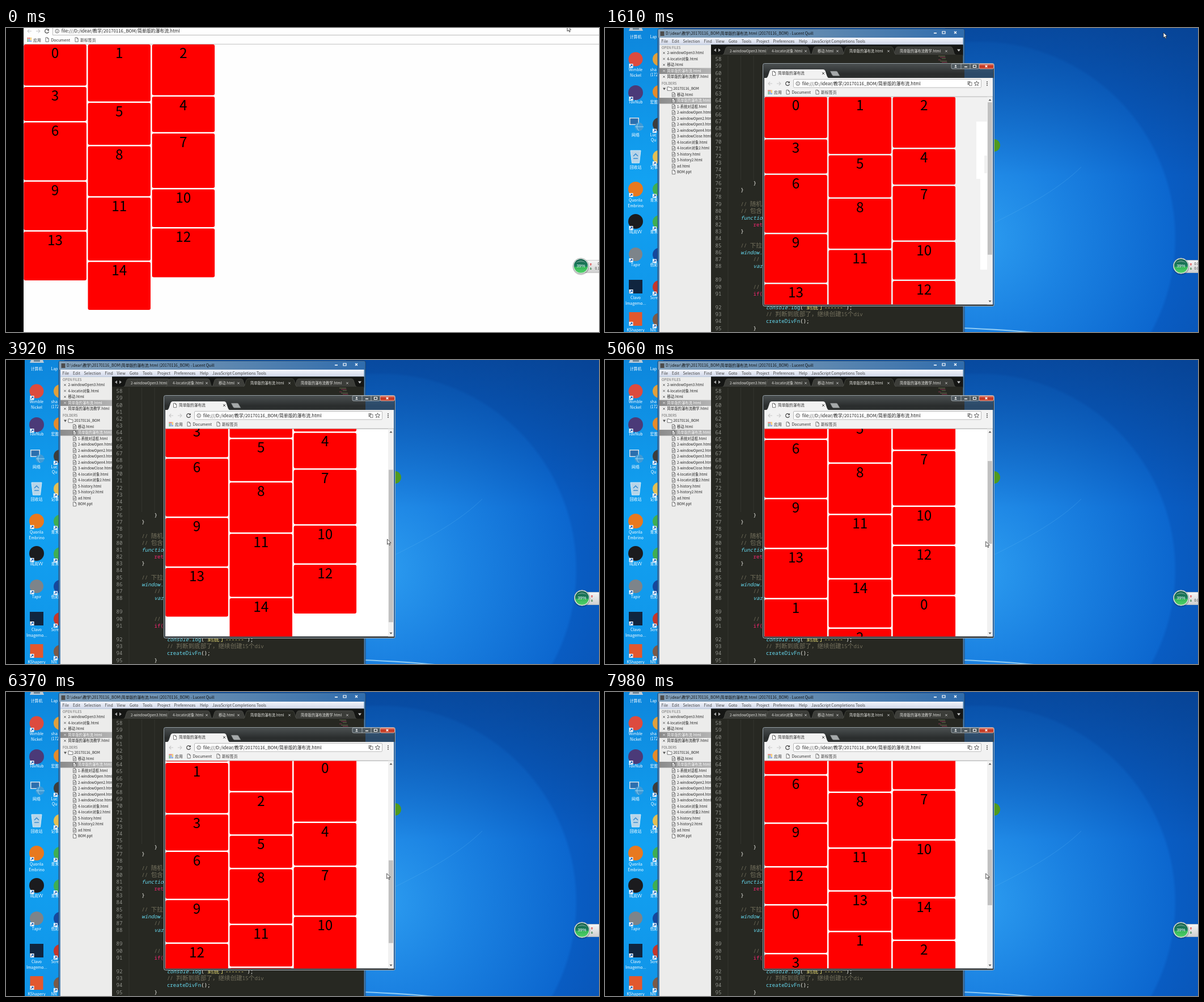
Write an HTML page that moves like this. It is 1046 by 536 pixels and loops after 8 s.

```html
<!DOCTYPE html>
<html lang="zh">
<head>
<meta charset="utf-8">
<title>瀑布流</title>
<style>
html, body { margin: 0; width: 100%; height: 100%; overflow: hidden; background: #000; }
svg { display: block; width: 100vw; height: 100vh; }
text { font-family: "Noto Sans CJK SC", "Noto Sans CJK", "Noto Sans", sans-serif; white-space: pre; }
.code { font-family: "Noto Sans Mono", "DejaVu Sans Mono", "Noto Sans CJK SC", monospace; }
.it { font-style: italic; }
.mid { text-anchor: middle; }
.num { font-size: 24.4px; text-anchor: middle; }
</style>
</head>
<body>
<svg id="stage" viewBox="0 0 1046 536" preserveAspectRatio="none"></svg>
<script>
const R = (x, y, w, h, fill, more = '') => `<rect x="${x}" y="${y}" width="${w}" height="${h}" fill="${fill}" ${more}/>`;
const C = (x, y, r, fill, more = '') => `<circle cx="${x}" cy="${y}" r="${r}" fill="${fill}" ${more}/>`;
const P = (d, fill, stroke = 'none', w = 1, more = '') => `<path d="${d}" fill="${fill}" stroke="${stroke}" stroke-width="${w}" ${more}/>`;
// y is the vertical middle of the line
const T = (x, y, s, size, fill, cls = '') => `<text x="${x}" y="${(y + size * .36).toFixed(2)}" font-size="${size}" fill="${fill}" class="${cls}">${s}</text>`;
const G = (id, body, more = '') => `<g id="${id}" ${more}>${body}</g>`;
const cross = (x, y, r, c, w = 1) => P(`M${x - r} ${y - r}l${2 * r} ${2 * r}m0 ${-2 * r}l${-2 * r} ${2 * r}`, 'none', c, w);
const page = (x, y, c = '#555') => P(`M${x - 2.5} ${y - 3.7}h3.2l2 2v5.4h-5.2zM${x + .7} ${y - 3.7}v2h2`, '#fff', c, .8);

const defs = `<defs>
<radialGradient id="glow" gradientUnits="userSpaceOnUse" cx="660" cy="370" r="520">
<stop offset="0" stop-color="#2c9cf0"/><stop offset=".3" stop-color="#1b82e2"/><stop offset=".66" stop-color="#0c67cf"/><stop offset=".67" stop-color="#095cc2"/><stop offset="1" stop-color="#084fae"/></radialGradient>
<linearGradient id="dusk" x2="0" y2="1"><stop offset="0" stop-color="#06397f" stop-opacity=".5"/><stop offset="1" stop-color="#06397f" stop-opacity="0"/></linearGradient>
<linearGradient id="left" x2="0" y2="1"><stop offset="0" stop-color="#0d86dc"/><stop offset=".5" stop-color="#12a2f2"/><stop offset="1" stop-color="#1094e8"/></linearGradient>
<linearGradient id="title"><stop offset="0" stop-color="#86a3bc"/><stop offset=".5" stop-color="#628ab0"/><stop offset="1" stop-color="#2f6cad"/></linearGradient>
<linearGradient id="menu" x2="0" y2="1"><stop offset="0" stop-color="#f3f5fb"/><stop offset="1" stop-color="#cfd6e8"/></linearGradient>
<linearGradient id="sel"><stop offset="0" stop-color="#8b8b8b"/><stop offset="1" stop-color="#b4b4b4"/></linearGradient>
<linearGradient id="glass" x2="0" y2="1"><stop offset="0" stop-color="#4a4f50"/><stop offset=".3" stop-color="#2a2d2d"/><stop offset="1" stop-color="#3a3d3c"/></linearGradient>
<linearGradient id="red" x2="0" y2="1"><stop offset="0" stop-color="#e0907f"/><stop offset=".5" stop-color="#c3331d"/><stop offset="1" stop-color="#d2553a"/></linearGradient>
<linearGradient id="pill" x2="0" y2="1"><stop offset="0" stop-color="#f6f6f6"/><stop offset="1" stop-color="#cfcfcf"/></linearGradient>
<linearGradient id="liquid" x2="0" y2="1"><stop offset="0" stop-color="#0e5a45"/><stop offset=".55" stop-color="#1f8561"/><stop offset=".56" stop-color="#35b558"/><stop offset="1" stop-color="#4fd068"/></linearGradient>
<clipPath id="view"><rect x="281" y="121.5" width="402.5" height="366"/></clipPath>
</defs>`;

function wallpaper() {
  return R(33, 0, 1013, 536, 'url(#glow)') + R(600, 0, 446, 260, 'url(#dusk)') + R(33, 0, 70, 536, 'url(#left)')
    + P('M687 343C750 312 805 280 840 245', 'none', '#5db6f2', 1, 'opacity=".3"')
    + P('M630 529C680 531 720 533 765 538', 'none', '#b9e6fb', 2.2, 'opacity=".75"')
    + C(686, 207, 11, '#4f9a1e');
}

function icons() {
  const label = (y, ...rows) => rows.map((s, i) => T(54, y + i * 9.3, s, 6.9, '#fff', 'mid')).join('');
  const link = (y, x = 42.5) => R(x, y, 7, 7, '#f4f8fc') + P(`M${x + 1.5} ${y + 5.5}l3.5 -3.5m-2.4 -.2h2.6v2.6`, 'none', '#1f62b5', 1.1);
  let s = P('M44 0h21l2 5h-25z', '#b9cad8') + R(49, 0, 11, 3, '#6e8799') + label(16, '计算机');
  s += C(54, 55, 12.5, '#dd4b3e') + link(63) + label(74, 'Wimble', 'Nickel');
  s += C(54, 114, 13, '#4b3a78') + link(121) + label(131, 'TovNub');
  s += R(43, 158, 17, 13, '#d7e3ec') + R(44.5, 159.5, 14, 10, '#2b6fae') + C(60, 174, 7.5, '#3f9ad6') + P('M53 174h15M60 167c-5 4-5 10 0 14', 'none', '#a9dcf2', .9) + label(189, '网络');
  s += P('M45 216h18l-2.5 22h-13z', '#c9dbe8', '#eef5f9', 1, 'opacity=".9"') + P('M50 226l4-4 4 4m-8 4h8', 'none', '#3d8fd1', 1.6) + label(246, '回收站');
  s += C(54, 284, 13, '#e8791f') + link(291) + label(304, 'Quorila', 'Embrino');
  s += C(54, 341, 13, '#1b1b1e') + link(349) + label(360, '鸣岚VV');
  s += C(54, 399, 12, '#7d848a') + link(406) + label(418, 'Tapir');
  s += R(42, 444, 24, 24, '#10253f') + link(461) + label(476, 'Clavo', 'Imagemo...');
  s += R(42.5, 501, 23, 24, '#e2582e') + link(518) + label(533, 'KShapery');
  const side = ['#e0a03c', '#e58b2b', '#3d3d3d', '#e3bf54', '#3fae53', '#3fae53', '#16489c', '#c4372c', '#7b5a48'];
  side.forEach((c, i) => s += C(96, 55 + i * 57.4, 12, c) + (i > 1 ? link(63 + i * 57.4, 84) : ''));
  [[16, 'Lap'], [74, 'sha'], [83, '(172'], [131, '宏图'], [189, 'Luc'], [198, ' Qu'], [246, '记事'], [304, '青禾'], [360, '青禾'], [418, '色彩'], [476, 'Scree'], [533, 'NN']]
    .forEach(([y, t]) => s += T(79.5, y, t, 6.9, '#fff'));
  return s;
}

const file = '简单版的瀑布流.html';

function editor() {
  let s = R(93, 1.5, 541, 540, '#4a7fb2', 'rx="3" stroke="#1d3a5a" stroke-width=".8"') + R(94, 2.5, 539, 14.5, 'url(#title)');
  s += R(97.5, 6, 7, 8, '#4c4c4c') + T(107, 10, `D:\\idear\\教学\\20170116_BOM\\${file} (20170116_BOM) - Lucent Quill`, 6.85, '#111');
  s += P('M580 9h5', 'none', '#fff', 1.6) + P('M595 6h5v4h-5z', 'none', '#fff', 1.2) + cross(618, 8, 2, '#fff', 1.3);
  s += R(96, 17, 535.5, 12.5, 'url(#menu)');
  [['File', 99.5], ['Edit', 118], ['Selection', 137.5], ['Find', 174.5], ['View', 195.5], ['Goto', 218], ['Tools', 241], ['Project', 267], ['Preferences', 296.5], ['Help', 342], ['JavaScript Completions Tools', 364]]
    .forEach(([t, x]) => s += T(x, 23.5, t, 6.9, '#444'));

  s += R(96, 29.5, 91, 507, '#ececeb') + T(100, 35, 'OPEN FILES', 6.1, '#666') + T(100, 97.5, 'FOLDERS', 6.1, '#666');
  s += R(96, 70.5, 91, 10.5, 'url(#sel)') + R(96, 123, 91, 10.5, 'url(#sel)');
  ['2-windowOpen3.html', '4-locatin对象.html', '移动.html', file, '简单版的瀑布流教学.html'].forEach((t, i) => {
    const y = 44 + i * 10.5, c = i == 3 ? '#fff' : '#222';
    s += cross(104, y, 1.7, i == 3 ? '#ddd' : '#666') + T(109.5, y, t, 6.35, c);
  });
  s += P('M102 105.5h5l-2.5 4z', '#555') + P('M110 104h3l1 1.2h4v5h-8z', '#fff', '#555', .8) + T(120.5, 107, '20170116_BOM', 6.3, '#222');
  ['移动.html', file, '1-系统对话框.html', '2-windowOpen.html', '2-windowOpen2.html', '2-windowOpen3.html', '2-windowOpen4.html', '3-windowClose.html', '4-locatin对象.html', '4-locatin对象2.html', '5-history.html', '5-history2.html', 'ad.html', 'BOM.ppt'].forEach((t, i) => {
    const y = 117.5 + i * 10.5;
    s += page(121, y) + (i < 13 ? P(`M119.5 ${y}h3m-3 1.7h3`, 'none', '#555', .8) : '') + T(127, y, t, 6.25, i == 1 ? '#fff' : '#222');
  });

  s += R(187, 29.5, 444.5, 507, '#272822') + R(187, 29.5, 444.5, 17.5, '#151614');
  s += P('M196 36v6l-4-3zM200 36v6l4-3z', '#aaa') + P('M621 37.5h6l-3 4z', '#ccc');
  [[212, 78, '2-windowOpen3.html', 0], [286, 74, '4-locatin对象.html', 354], [367, 52, '移动.html', 410], [512, 102, '简单版的瀑布流教学.html', 602], [423, 86, file, 500]].forEach(([x, w, t, close], i) => {
    s += P(`M${x - 6} 47.5q4 0 5 -6l2 -6q1 -2.5 4 -2.5h${w - 10}q3 0 4 2.5l2 6q1 6 5 6z`, i == 4 ? '#272822' : '#3c3d39', '#5a5b55', .6);
    s += T(x + 8, 40.8, t, 6.3, '#e4e4e0') + (close ? cross(close, 40.8, 1.7, '#bbb') : '');
  });
  s += R(187, 47, 444.5, 2, '#272822');
  for (let i = 0; i < 6; i++) s += R(588 + i % 3 * 3, 49 + i * 2.2, 12 - i % 4 * 2.5, 1, i % 2 ? '#8a3550' : '#66704f');
  [217, 239.5, 262].forEach((x, i) => s += P(`M${x} 49V${i ? 268 : 536}`, 'none', '#3b3c36', .7));

  const row = n => 55 + (n - 58 + (n > 88) + (n > 91)) * 12.16;
  for (let n = 58; n <= 95; n++) s += T(194.5, row(n), n, 9.15, '#8f908a', 'code');
  const cjk = t => t.replace(/[\u3000-\uffef]+/g, '<tspan font-size="10.6">$&</tspan>');
  const white = '#f8f8f2', grey = '#75715e', pink = '#f92672', cyan = '#66d9ef', str = '<tspan fill="#e6db74">';
  [[76, 2, '}', white], [77, 1, '}', white], [79, 1, '// 随机', grey], [80, 1, '// 包含', grey], [81, 1, 'function', cyan, 'it'],
   [82, 2, 'return', pink], [83, 1, '}', white], [85, 1, '// 下拉', grey], [86, 1, 'window.', cyan, 'it'], [87, 2, '//', grey],
   [88, 2, 'var', cyan, 'it'], [90, 2, '//', grey], [91, 2, 'if(', pink],
   [92, 3, `<tspan class="it">console</tspan>.log<tspan fill="${white}">(</tspan>${str}"到底了------"</tspan><tspan fill="${white}">);</tspan>`, cyan],
   [93, 3, '// 判断到底部了，继续创建15个div', grey], [94, 3, `createDivFn<tspan fill="${white}">();</tspan>`, cyan], [95, 2, '}', white]]
    .forEach(([n, tab, t, c, cls = '']) => s += T(217 + tab * 22.3, row(n), cjk(t), 9.15, c, 'code ' + cls));
  return s;
}

function frame() {
  let s = R(278.5, 62.5, 408, 428, '#3a4145', 'rx="3" stroke="#b3bec5" stroke-width=".8"') + R(279.5, 63.5, 406, 58, 'url(#glass)', 'rx="2"');
  s += R(634, 64, 51, 24, '#2d6299', 'opacity=".55"') + R(684, 88, 2, 400, '#2f66a0');
  s += R(611, 63, 49, 9, '#4f595f', 'rx="2" stroke="#c7d0d6" stroke-width=".7"') + R(660, 63, 25.5, 9, 'url(#red)', 'rx="2" stroke="#e8c9c2" stroke-width=".7"');
  s += P('M628 63v9M644 63v9', 'none', '#c7d0d6', .7) + C(618.5, 66.5, 1.3, '#fff') + P('M616 70q2.5 -3 5 0z', '#fff');
  s += P('M634 68.5h5', 'none', '#fff', 1.5) + P('M649.5 65.5h5v4h-5z', 'none', '#fff', 1.1) + cross(672.5, 67.5, 1.8, '#fff', 1.3);
  s += R(281, 88, 403, 33.5, '#f2f2f2') + P('M283 88.5q3 0 4.5 -4l3 -9q1 -2.5 3.5 -2.5h91q2.5 0 3.5 2.5l3 9q1.5 4 4.5 4z', '#f2f2f2');
  s += P('M397 76h11q1.5 0 2.2 1.5l4 7h-11q-2 0 -2.8 -2z', '#a5a9aa', '#55595a', .6);
  s += page(298, 80) + T(305, 80, '简单版的瀑布流', 6.7, '#333') + cross(385, 80, 2, '#444');
  s += R(332.5, 90.5, 331, 14.5, '#fff', 'rx="1.5" stroke="#b4b4b4" stroke-width=".9"');
  s += R(639.5, 94, 5, 6, '#8a8a8a') + R(642.5, 96, 4.5, 5.5, '#fff', 'stroke="#666" stroke-width=".8"') + T(640, 97, 'A', 4, '#fff');
  s += P('M655.5 93.5l1.2 2.9 3.1 .2-2.4 2 .8 3-2.7-1.7-2.7 1.7 .8-3-2.4-2 3.1-.2z', 'none', '#555', .9);
  [95, 98, 101].forEach(y => s += C(674, y, .9, '#444'));
  return s + P('M281 121h403', 'none', '#bdbdbd', .9);
}

function toolbar() {
  const arrow = (x, d) => P(`M${x + 3.5 * d} 98h${-7 * d}m${3.2 * d} -3.2l${-3.2 * d} 3.2l${3.2 * d} 3.2`, 'none', '#c8c8c8', 1.1);
  let s = arrow(291.5, 1) + arrow(306.5, -1);
  s += P('M325 96.3a3.4 3.4 0 1 0 .4 2.5', 'none', '#444', 1.2) + P('M325.9 93.8v3.4h-3.4z', '#444');
  s += C(340.2, 98, 3.3, 'none', 'stroke="#555" stroke-width=".9"') + P('M340.2 97.5v2.3m0 -3.8v.9', 'none', '#555', .9);
  s += T(347.7, 98, `file:///D:/idear/教学/20170116_BOM/${file}`, 7.9, '#222');
  const dots = ['#e0483b', '#e0483b', '#f0b42c', '#3a9c58', '#4a7de0', '#f0b42c', '#3a9c58', '#4a7de0', '#4a7de0'];
  dots.forEach((c, i) => s += R(287.5 + i % 3 * 2.7, 109.5 + (i / 3 | 0) * 2.7, 1.9, 1.9, c));
  return s + T(298, 113.7, '应用', 6.9, '#333') + page(322.5, 113) + T(329.5, 113.7, 'Document', 6.9, '#333')
    + page(374.5, 113) + T(381, 113.7, '新标签页', 6.9, '#333');
}

// Every card goes under the shortest column.
const heights = [
  72.5, 100.5, 89.5, 60, 62.5, 74, 102, 96, 88, 85.5, 66.5, 111, 86, 86, 84.5,
  109, 88.5, 74, 63.5, 75, 56.5, 82.5, 85.5, 96, 74.5, 99.5, 73, 64.5, 69, 72.5,
  83.5, 90, 80, 70];
function cards() {
  const cols = [0, 0, 0], sets = ['', '', ''];
  heights.forEach((h, i) => {
    const c = cols.indexOf(Math.min(...cols)), x = 281.4 + c * 113.1, y = 121.5 + cols[c];
    sets[i / 15 | 0] += R(x, y, 110.5, h, '#f00', 'rx="3"') + `<text x="${x + 55.2}" y="${y + 23.9}" class="num">${i % 15}</text>`;
    cols[c] += h + 2.5;
  });
  return sets.map((s, i) => G('set' + i, s)).join('');
}

const ball = R(1010, 409.5, 50, 22, 'url(#pill)', 'rx="3" stroke="#bdbdbd" stroke-width=".8"')
  + P('M1033.5 419v-3.8m-1.5 1.5l1.5 -1.7 1.5 1.7', 'none', '#d33', 1) + P('M1033.5 422v3.8m-1.5 -1.5l1.5 1.7 1.5 -1.7', 'none', '#2f7d46', 1)
  + G('up', '') + G('down', '')
  + C(1016, 421, 14.5, '#000', 'opacity=".2"') + C(1016, 419.5, 13.7, '#f3f5f4', 'stroke="#8d9a94" stroke-width=".8"') + C(1016, 419.5, 12.2, 'url(#liquid)')
  + P('M1007 414q9 -9 18 0q-9 -3 -18 0z', '#fff', 'none', 0, 'opacity=".25"')
  + `<text x="1016" y="422.3" font-size="7.6" fill="#fff" class="mid" style="font-family:'Liberation Sans',sans-serif">39%</text>`;

const stage = document.getElementById('stage');
stage.innerHTML = defs + R(0, 0, 1046, 536, '#000')
  + G('desk', wallpaper() + icons() + editor())
  + G('win',
      G('frame', frame())
      + G('full', R(281, 90, 1100, 560, '#fefefe') + P('M332.5 90v15h1000', 'none', '#b4b4b4', .9) + P('M281 121h1100', 'none', '#bdbdbd', .9) + G('hint', R(1263, 105.5, 40, 15, '#f0f0f0')))
      + toolbar()
      + G('page', G('paper', R(281, 121.5, 403, 366, '#fff'))
        + G('stale', R(281, 121.5, 393, 366, '#f1f1f1') + P('M655 165h19v60h-5v31h5v170h-12v-160h-7z', '#fff'))
        + G('cards', cards()))
      + G('scroller', R(674, 121.5, 9.8, 366, '#f1f1f1') + P('M676.5 128.2h5l-2.5 -3zM676.5 480.5h5l-2.5 3z', '#555') + '<rect id="thumb" x="675" width="7.8" fill="#c1c1c1"/>'))
  + G('ball', ball)
  + G('cursor', P('M0 0V9.2L2.1 7.2 3.7 10.6 5.2 9.9 3.7 6.7 6.6 6.5Z', '#fff', '#222', .8));

const el = id => document.getElementById(id);
const show = (id, on) => el(id).style.display = on ? '' : 'none';
const move = (id, x, y) => el(id).setAttribute('transform', `translate(${x} ${y})`);
const at = (keys, t) => keys.filter(k => k[0] <= t).pop();

const RESTORE = 1600;
const shiftKeys = [[0, 0], [130, .7], [280, 1.4], [430, 2]];
const scrollKeys = [[0, 0],
  [3410, 12], [3540, 32], [3670, 52], [3800, 70], [3920, 85], [4070, 105],
  [4940, 118], [5080, 160], [5220, 205], [5360, 240], [5500, 262], [5640, 271.5],
  [6070, 300], [6210, 360], [6350, 415], [6490, 440],
  [7140, 449.5], [7280, 468], [7420, 490], [7560, 501], [7700, 515], [7840, 535], [7980, 549.5]];
const cursorKeys = [[0, 990, -3.5], [130, 992, -7], [280, 996, -20],
  [1600, 985, 8], [1740, 930, 50], [1880, 860, 110], [2020, 790, 170], [2150, 730, 225], [2290, 690, 262], [2430, 670, 284],
  [2580, 669.5, 290], [2715, 671, 298], [2850, 672, 303.5], [3130, 672.5, 303.5],
  [3540, 672.5, 308], [3800, 672.5, 313], [3920, 672.5, 316], [4070, 672, 318], [4940, 671.7, 320]];
const speedKeys = [[0, '0', '0.1'], [430, '', ''], [RESTORE, '0.0', '0.0'], [3410, '', ''], [4940, '', '0.0'], [6070, '', '']];
const pageHeights = [470, 866, 1292];

function draw(t) {
  const full = t < RESTORE, shift = at(shiftKeys, t)[1], y = at(scrollKeys, t)[1];
  const sets = y >= 501 ? 3 : y >= 105 ? 2 : 1, total = pageHeights[sets - 1];
  for (const id of ['desk', 'frame', 'scroller', 'paper']) show(id, !full);
  show('full', full);
  show('hint', t >= 1460);
  show('stale', !full && t < 3410);
  move('win', full ? shift - 250 : 0, full ? -92.5 : 0);
  el('page').setAttribute('clip-path', full ? 'none' : 'url(#view)');
  move('cards', 0, -y);
  for (let i = 0; i < 3; i++) show('set' + i, i < sets);
  el('thumb').setAttribute('y', 131 + y * 346 / total);
  el('thumb').setAttribute('height', 365 * 346 / total);
  move('ball', shift - 2, 0);
  const [, up, down] = at(speedKeys, t);
  el('up').innerHTML = T(up == '0' ? 1045.5 : 1039.5, 416.3, up, 5.6, '#333');
  el('down').innerHTML = T(1041 - (down == '0.0') * 1.5, 424.2, down, 5.6, '#333');
  const [, cx, cy] = at(cursorKeys, t);
  move('cursor', cx, cy);
}

const start = performance.now();
function tick() {
  draw((performance.now() - start) % 8000);
  requestAnimationFrame(tick);
}
tick();
</script>
</body>
</html>
```
